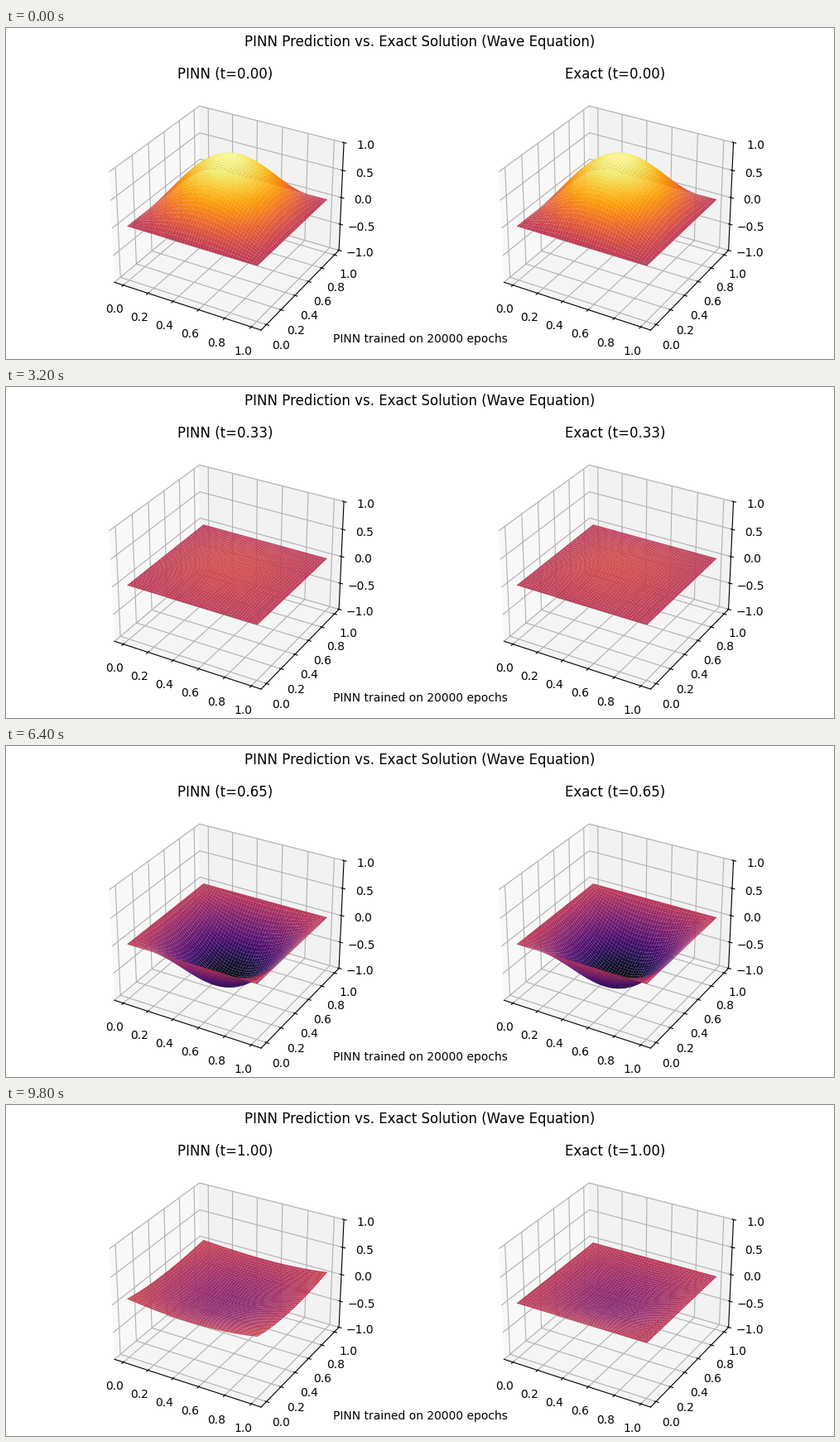
A matplotlib script that plays this animation: 1000x400 px, repeating every 10 s.

```python
import numpy as np
import matplotlib.pyplot as plt
from matplotlib.animation import FuncAnimation

W, H, DPI = 1000, 400, 100
FRAMES, INTERVAL = 50, 200
SIDE, BOTTOM = 315.2, 15  # square plot area, in pixels

grid = np.linspace(0, 1, 50)
X, Y = np.meshgrid(grid, grid)
MODE = np.sin(np.pi * X) * np.sin(np.pi * Y)
CORNERS = ((2 * X - 1) * (2 * Y - 1)) ** 2 * (0.08 + 0.03 * (X - Y))


def exact(t):
    return MODE * np.cos(np.sqrt(2) * np.pi * t)


def pinn(t):
    """The network drifts: slightly weak amplitude, corners lifting late."""
    return exact(t) * (1 - 0.04 * t) + CORNERS * t ** 9


def quads(z):
    p = np.stack([X, Y, z], axis=-1)
    return np.stack([p[:-1, :-1], p[:-1, 1:], p[1:, 1:], p[1:, :-1]],
                    axis=2).reshape(-1, 4, 3)


fig = plt.figure(figsize=(W / DPI, H / DPI), dpi=DPI)
fig.suptitle("PINN Prediction vs. Exact Solution (Wave Equation)")
fig.text(0.5, 0.05, "PINN trained on 20000 epochs", ha="center", fontsize=10)


def make_plot(center, name, solution):
    left = center - SIDE / 2
    ax = fig.add_axes([left / W, BOTTOM / H, SIDE / W, SIDE / H],
                      projection="3d")
    surface = ax.plot_surface(X, Y, solution(0), cmap="inferno",
                              vmin=-1, vmax=1)
    ax.set_zlim(-1, 1)
    return ax, surface, name, solution


plots = [make_plot(264.8, "PINN", pinn), make_plot(735.3, "Exact", exact)]


def update(frame):
    t = frame / (FRAMES - 1)
    for ax, surface, name, solution in plots:
        faces = quads(solution(t))
        surface.set_verts(faces)
        surface.set_array(faces[..., 2].mean(axis=-1))
        ax.set_title(f"{name} (t={t:.2f})")
    return [plot[1] for plot in plots]


anim = FuncAnimation(fig, update, frames=FRAMES, interval=INTERVAL,
                     repeat=True, blit=False)
plt.show()
```
